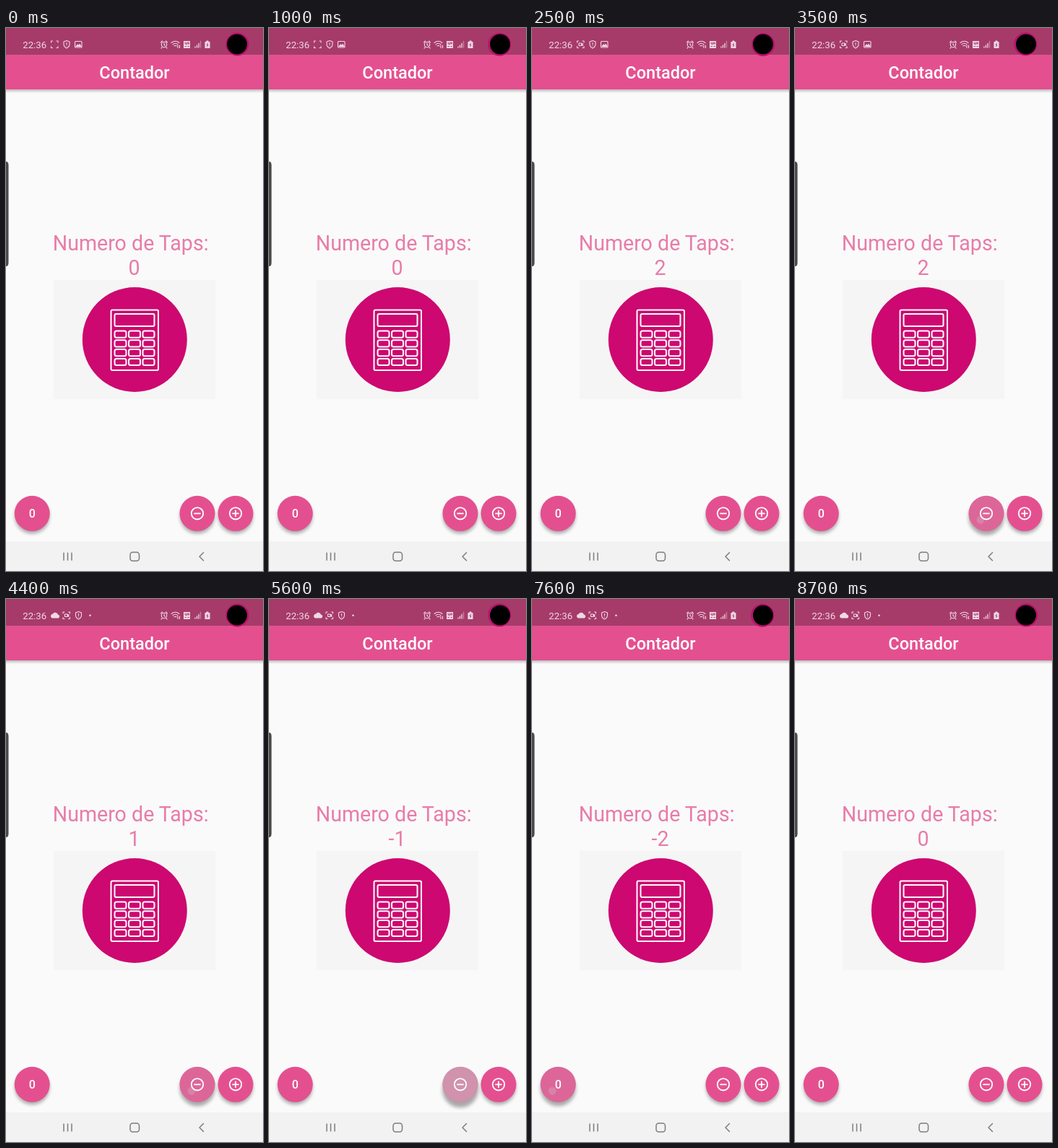
Recreate the animation shown at these times as an HTML page. Size 356 by 752 pixels, loop 8800 ms.

```html
<!DOCTYPE html>
<html lang="es">
<head>
<meta charset="utf-8">
<title>Contador</title>
<style>
  html, body { margin: 0; width: 100%; height: 100%; overflow: hidden; background: #fafafa; }
  svg { display: block; width: 100vw; height: 100vh; }
  text { font-family: Roboto, sans-serif; }
  .line { fill: none; stroke-linecap: round; stroke-linejoin: round; }
</style>
</head>
<body>
<svg viewBox="0 0 356 752">
  <defs>
    <clipPath id="disc"><circle r="24.5"/></clipPath>
    <filter id="soft" x="-50%" y="-50%" width="200%" height="200%"><feGaussianBlur stdDeviation="2.5"/></filter>
    <linearGradient id="barShadow" x2="0" y2="1">
      <stop stop-color="#000" stop-opacity=".24"/>
      <stop offset="1" stop-color="#000" stop-opacity="0"/>
    </linearGradient>
  </defs>

  <rect width="356" height="752" fill="#fafafa"/>
  <rect y="85" width="356" height="5" fill="url(#barShadow)"/>
  <rect width="356" height="85" fill="#e4508f"/>
  <rect width="356" height="37" fill="#a63b6a"/>
  <text x="178" y="70" font-size="23.5" font-weight="500" fill="#fff" text-anchor="middle">Contador</text>

  <!-- Status bar -->
  <text x="23.3" y="27.5" font-size="13.2" fill="#f0d9e4">22:36</text>
  <g class="line" stroke="#f0d9e4" stroke-width="1.1">
    <path id="cloud" d="M64 26h7.5a2 2 0 0 0 0-4a3.4 3.4 0 0 0-6.4-.6a2.4 2.4 0 0 0-1.1 4.600z" fill="#f0d9e4"/>
    <g id="notices">
      <path d="M62.500 20v-2h2M70 18h2v2M72 25.500v2h-2M64.500 27.500h-2v-2"/>
      <path id="recorder" d="M65 21h3.500v3.500h-3.500zM68.500 22.500l1.700-1v3z"/>
      <path d="M84 17.500l4 1.500v3.500q0 3.500-4 5.500q-4-2-4-5.500v-3.500zM84 20.500v2.500M84 25v.1"/>
    </g>
    <g id="picture">
      <rect x="95.500" y="18.500" width="9.500" height="8.500" rx="1"/>
      <path d="M97 25.500l2-2.500l1.500 1.500l1.500-2l2 3z" fill="#f0d9e4"/>
    </g>
    <circle id="more" cx="116.500" cy="22.700" r="1.300" fill="#f0d9e4" stroke="none"/>
    <circle cx="219" cy="23" r="3.700"/>
    <path d="M219 21v2.200l1.500 1M214.500 20l2-2M223.500 20l-2-2M216 27l-1 1M222 27l1 1"/>
    <path d="M229 20.500q5.500-4.500 11 0M231 22.700q3.500-2.800 7 0M233 24.800q1.500-1.200 3 0M238 24v3.500M240.500 27.500v-3.500"/>
    <rect x="246" y="18" width="9" height="10" fill="#f0d9e4" stroke="none"/>
    <path d="M248 20v2h2M250 20v3M252 20h1.500v2h-1.500zM248 25.500h1.500M252 25.500h1.500" stroke="#a63b6a" stroke-width=".9"/>
    <path d="M262 27v-1M264.500 27v-3M267 27v-5.500" stroke-width="1.300"/>
    <path d="M269.500 27v-8.500" stroke-width="1.300" opacity=".45"/>
    <path d="M276 19.500h2v-1.500h2v1.500h2v8h-6z" fill="#f0d9e4"/>
    <path d="M279.500 21l-1.500 2.500h2l-1.500 2.500" stroke="#a63b6a" stroke-width=".9"/>
  </g>
  <circle id="ring" r="15" fill="none" stroke="#c20a70" stroke-width="2"/>
  <circle cx="320" cy="22.500" r="14" fill="#000"/>

  <path d="M0 185q3.500 0 3.500 5v135q0 5-3.500 5z" fill="#4b4b4b"/>

  <!-- Counter and calculator -->
  <g font-size="28.6" fill="#e87ca8">
    <text x="64.800" y="308">Numero de Taps:</text>
    <text id="count" x="177.500" y="342" text-anchor="middle"></text>
  </g>
  <rect x="66" y="349" width="224" height="165" fill="#f5f5f5"/>
  <circle cx="178.300" cy="431.500" r="72.500" fill="#cd0870"/>
  <g id="calculator" class="line" stroke="#fff" stroke-width="2">
    <rect x="145.500" y="390.500" width="65.500" height="83.500" rx="2"/>
    <rect x="150.500" y="396" width="55" height="17" rx="2"/>
  </g>

  <g id="buttons"></g>

  <!-- Navigation bar -->
  <rect y="711" width="356" height="41" fill="#f2f2f2"/>
  <g class="line" stroke="#7d7d7d" stroke-width="1.500">
    <path d="M80 726.500v11M85.500 726.500v11M91 726.500v11" stroke-linecap="butt"/>
    <rect x="172" y="726" width="12.500" height="12" rx="3.500"/>
    <path d="M273.500 726.500l-5.500 5.500l5.500 5.500"/>
  </g>
</svg>

<script>
const LOOP = 8800, STEP = 100, RELEASE = 150;
const $ = id => document.getElementById(id);
const clamp = v => Math.max(0, Math.min(1, v));

function add(parent, tag, attrs) {
  const node = document.createElementNS('http://www.w3.org/2000/svg', tag);
  for (const name in attrs) node.setAttribute(name, attrs[name]);
  return parent.appendChild(node);
}

for (let row = 0; row < 4; row++)
  for (let col = 0; col < 3; col++)
    add($('calculator'), 'rect', {
      x: 150.5 + 19.5 * col, y: 419.5 + 12.8 * row, width: 16, height: 9.2, rx: 2.5
    });

function makeButton(x, icon, taps, apply) {
  const group = add($('buttons'), 'g', { transform: `translate(${x} 672.3)` });
  const shadow = add(group, 'circle', { fill: '#000', filter: 'url(#soft)' });
  add(group, 'circle', { r: 24.5, fill: '#e4508f' });
  const highlight = add(group, 'circle', { r: 24.5, fill: '#bcbcbc' });
  const ripple = add(group, 'g', { 'clip-path': 'url(#disc)' });
  const splash = add(ripple, 'circle', { cx: -8, cy: 9, fill: '#c8c8c8' });
  if (icon === '0') {
    add(group, 'text', {
      y: 5.7, 'font-size': 16, 'font-weight': 500, fill: '#fff', 'text-anchor': 'middle'
    }).textContent = icon;
  } else {
    const lines = add(group, 'g', { class: 'line', stroke: '#fff', 'stroke-width': 1.8 });
    add(lines, 'circle', { r: 8.2 });
    add(lines, 'path', { d: icon });
  }

  function draw(time) {
    const age = Math.min(...taps.filter(tap => tap <= time).map(tap => time - tap), LOOP);
    const fade = clamp((700 - age) / 300);
    const lit = Math.min(clamp(age / 200), fade);
    shadow.setAttribute('r', 24 + lit);
    shadow.setAttribute('cy', 4 + 3 * lit);
    shadow.setAttribute('opacity', 0.32);
    highlight.setAttribute('opacity', 0.4 * lit);
    splash.setAttribute('r', 40 * clamp(age / 350) ** 1.6);
    splash.setAttribute('opacity', 0.3 * fade);
  }
  return { taps, apply, draw };
}

const buttons = [
  makeButton(36.2, '0', [7500], () => 0),
  makeButton(265, 'M-4 0h8', [3400, 4300, 5250, 6150], n => n - 1),
  makeButton(318, 'M-4 0h8M0 -4v8', [1000, 1800], n => n + 1)
];
const presses = buttons
  .flatMap(({ taps, apply }) => taps.map(at => ({ at, apply })))
  .sort((a, b) => a.at - b.at);

function show(id, visible) {
  $(id).style.visibility = visible ? 'visible' : 'hidden';
}

function render(now) {
  const time = Math.floor(now % LOOP / STEP) * STEP;
  $('count').textContent = presses
    .filter(press => time >= press.at + RELEASE)
    .reduce((n, press) => press.apply(n), 0);
  buttons.forEach(button => button.draw(time));

  const cloudy = time >= 3600;
  show('cloud', cloudy);
  show('more', cloudy);
  show('picture', !cloudy);
  $('notices').setAttribute('transform', `translate(${cloudy ? 16.5 : 0} 0)`);
  show('recorder', (time + 250) % 1000 >= 500);

  const angle = time / LOOP * Math.PI * 8;
  $('ring').setAttribute('cx', 319.8 + 0.6 * Math.cos(angle));
  $('ring').setAttribute('cy', 22.5 + 0.6 * Math.sin(angle));
}

const start = performance.now();
function tick() {
  render(performance.now() - start);
  requestAnimationFrame(tick);
}
tick();
</script>
</body>
</html>
```
